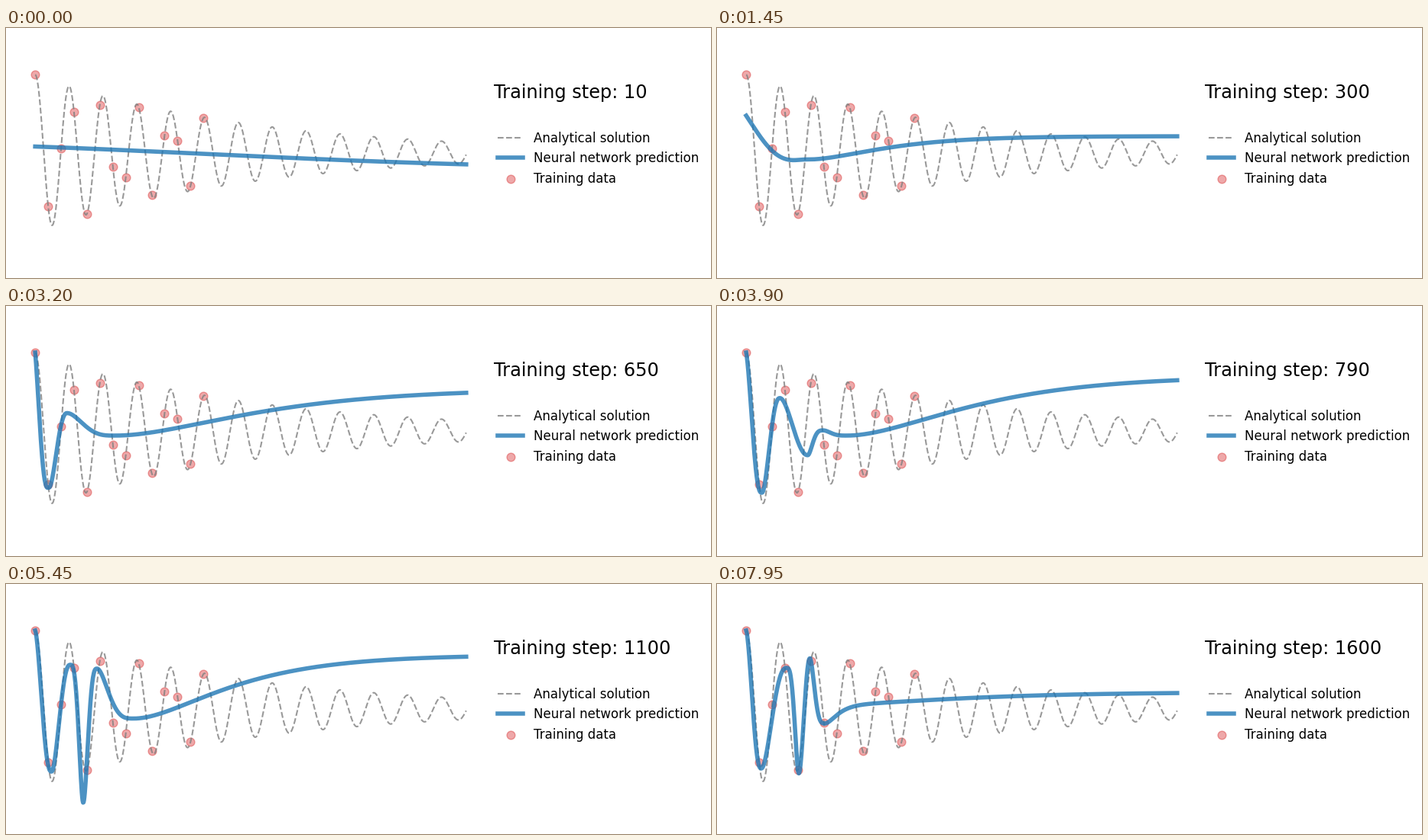
Animation of 922 by 328 pixels, one loop 8000 ms. Source, as a matplotlib script:

```python
import numpy as np
import matplotlib.pyplot as plt
from matplotlib.animation import FuncAnimation

W, H, DPI = 922, 328, 100
FRAMES, INTERVAL = 160, 50
AX_W, AX_H, PAD = 620, 308, 10
X_MIN, X_MAX, Y_LIM = -0.05, 1.05, 1.5

X_SCALE = AX_W / (X_MAX - X_MIN)
Y_SCALE = AX_H / (2 * Y_LIM)
LEFT = PAD - X_MIN * X_SCALE
MIDDLE = H / 2


def oscillator(x, d=2, w0=80):
    """Underdamped oscillator starting at rest from 1."""
    w = np.sqrt(w0**2 - d**2)
    phi = np.arctan(-d / w)
    return np.exp(-d * x) * np.cos(phi + w * x) / np.cos(phi)


def ramp(t, t0, t1, a=0, b=1):
    return a + (b - a) * np.clip((t - t0) / (t1 - t0), 0, 1)


def smooth(u):
    return u * u * (3 - 2 * u)


def skewed(u, k):
    """Smooth step that is quicker early (k > 0) or late (k < 0)."""
    return smooth(1 - (1 - u)**(1 + k) if k >= 0 else u**(1 - k))


def settle(z):
    return 1 - (1 + z) * np.exp(-z)


def glide(t, *keys):
    """Smooth path through (time, value, ...) keys without overshoot."""
    keys = np.array(keys, float)
    times, v = keys[:, 0], keys[:, 1:]
    gap = np.diff(times)
    rate = np.diff(v, axis=0) / gap[:, None]
    a, b = rate[:-1], rate[1:]
    slope = np.zeros_like(v)
    same = a * b > 0
    slope[1:-1] = np.where(same, 2 * a * b / np.where(same, a + b, 1), 0)

    t = np.clip(t, times[0], times[-1])
    i = min(np.searchsorted(times, t, side="right"), len(gap)) - 1
    u = (t - times[i]) / gap[i]
    ease = v[i] + (v[i + 1] - v[i]) * smooth(u)
    bend = (1 - u) * slope[i] - u * slope[i + 1]
    return ease + gap[i] * u * (1 - u) * bend


# Paths (ms, x, y) of the troughs and crests, in order of appearance
TURNS = [
    [(0, 1038, 183), (850, 180, 174), (1450, 115, 172.5),
     (2600, 55, 230), (4500, 60, 247), (7950, 58, 242)],
    [(1450, 116, 172.5), (3200, 80, 140.5), (4500, 84, 109),
     (5450, 84, 106), (7950, 91, 110)],
    [(1450, 117, 172.5), (3200, 141, 170), (4500, 101, 232.5),
     (5450, 101, 287), (7950, 107, 248.5)],
    [(3200, 142, 170), (4500, 134, 151), (5450, 119, 111),
     (6850, 117, 75.5), (7950, 121.5, 97.5)],
    [(3200, 143, 170), (4500, 191, 170), (5450, 167, 176.5),
     (7950, 141, 183)],
]


def turning_points(t):
    """Each turn waits beside the one before until its path begins."""
    points = []
    for path in TURNS:
        if t < path[0][0]:
            points.append(points[-1] + (1, 0))
        else:
            points.append(glide(t, *path))
    return points


def prediction(t, px):
    """Height of the fitted curve at each pixel column."""
    turns = turning_points(t)
    skews = (0.25, ramp(t, 3200, 4900, 0.6, -0.6),
             ramp(t, 4500, 7000, 0.75, 0.1), 0.75)

    # first drop, steep from the left end
    y0 = glide(t, (0, 155.5), (1450, 115), (2500, 61))
    slope = glide(t, (0, 1.3), (1450, 2), (3200, 1.2), (4500, 0.3))
    x1, y1 = turns[0]
    u = np.clip((px - LEFT) / (x1 - LEFT), 0, 1)
    py = y0 + (y1 - y0) * (skewed(u, 0.25) + slope * u * (1 - u)**2)

    # swings between turning points
    for (xa, ya), (xb, yb), k in zip(turns, turns[1:], skews):
        u = np.clip((px - xa) / (xb - xa), 0, 1)
        py = py + (yb - ya) * skewed(u, k)

    # tail settling towards a slowly swaying level
    xt, yt = turns[-1]
    level = 113.5 - 28.5 * np.cos(np.pi * (t - 4650) / 3250)
    long = glide(t, (850, 110), (1450, 62), (3200, 112), (4500, 88),
                 (7950, 105))
    short = long * ramp(t, 4500, 7950, 1, 0.1)
    z = np.maximum(px - xt, 0)
    return py + (level - yt) * (0.6 * settle(z / short) + 0.4 * settle(z / long))


fig = plt.figure(figsize=(W / DPI, H / DPI), dpi=DPI, facecolor="white")
ax = fig.add_axes([PAD / W, PAD / H, AX_W / W, AX_H / H])
ax.set_xlim(X_MIN, X_MAX)
ax.set_ylim(-Y_LIM, Y_LIM)
ax.axis("off")

x = np.linspace(0, 1, 1000)
px = LEFT + x * X_SCALE
y = oscillator(x)

ax.plot(x, y, "--", color="grey", lw=1.5, alpha=0.8,
        label="Analytical solution")
fit, = ax.plot(x, y, color="tab:blue", lw=4, alpha=0.8,
               label="Neural network prediction")
ax.scatter(x[:400:30], y[:400:30], s=60, color="tab:red", alpha=0.4,
           label="Training data")
ax.legend(loc=(1.01, 0.34), frameon=False, fontsize="large",
          labelcolor="black")
title = ax.text(1.065, 0.7, "", fontsize="xx-large", color="black")


def update(n):
    fit.set_ydata((MIDDLE - prediction(n * INTERVAL, px)) / Y_SCALE)
    title.set_text(f"Training step: {10 * (n + 1)}")
    return fit, title


anim = FuncAnimation(fig, update, frames=FRAMES, interval=INTERVAL,
                     repeat=True, repeat_delay=0)
plt.show()
```
